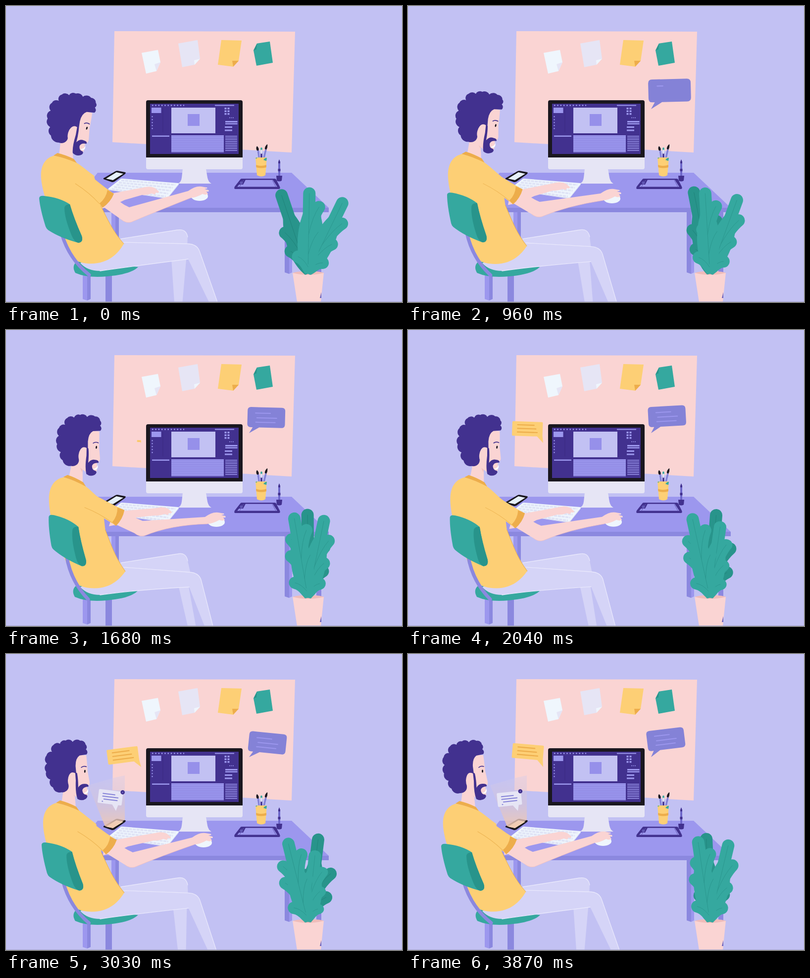
An HTML page that plays this animation: 800x600 px, repeating every 3900 ms.

```html
<!DOCTYPE html>
<html lang="en">
<head>
<meta charset="utf-8">
<title>Designer at a desk</title>
<style>
html, body { margin: 0; width: 100%; height: 100%; overflow: hidden; background: #c2c1f3; }
svg { display: block; width: 100vw; height: 100vh; }
.skin { fill: #fad4d3; } .dark { fill: #42318f; } .lilac { fill: #9c97ee; } .edge { fill: #8b88df; }
.pale { fill: #e6e5f5; } .ice { fill: #eff6fd; } .sun { fill: #fdcf75; } .amber { fill: #edad4b; }
.teal { fill: #35a89f; } .deep { fill: #28948b; } .ink { fill: #1a171f; } .cloth { fill: #d5d4f7; }
.line { fill: none; stroke-linecap: round; stroke-linejoin: round; }
</style>
</head>
<body>
<svg viewBox="0 0 800 600" preserveAspectRatio="none">
<defs>
  <linearGradient id="glow" x1="0" y1="1" x2="0" y2="0">
    <stop offset="0" stop-color="#f3c9ad" stop-opacity=".9"/>
    <stop offset=".45" stop-color="#d9c4d2" stop-opacity=".6"/>
    <stop offset="1" stop-color="#cfcbee" stop-opacity=".35"/>
  </linearGradient>
</defs>
<rect width="800" height="600" fill="#c2c1f3"/>
<path d="M219 51L584 52 577 297 215 276Z" class="skin"/>
<g id="notes">
  <path class="ice" d="M274 95L307 89 312 114 304 132 283 137Z"/>
  <path class="pale" d="M300 118L312 114 304 132Z"/>
  <path class="pale" d="M348 76L387 69 392 107 381 119 356 124Z"/>
  <path class="ice" d="M380 110L392 107 381 119Z"/>
  <path class="sun" d="M435 69L476 70 470 111 459 123 428 119Z"/>
  <path class="amber" d="M457 111L470 111 459 123Z"/>
  <path class="teal" d="M507 76L533 72 539 115 506 121 500 90Z"/>
  <path class="deep" d="M507 76L506 88 500 90Z"/>
</g>
<g id="desk">
  <path class="lilac" d="M213 418h8v90h-8zM572 418h6v122l-6 3z"/>
  <path class="edge" d="M221 418h7v90h-7zM563 418h9v125l-9-3zM627 418h10v172l-10 4z"/>
  <path class="lilac" d="M185 338H577L652 409H130Z"/>
  <path class="edge" d="M130 409H652V418H130Z"/>
</g>
<g id="monitor">
  <path class="pale" d="M357 330H404L407 348Q409 357 415 360H347Q354 357 355 348Z"/>
  <path class="pale" d="M283 306H478V327Q478 331 474 331H287Q283 331 283 327Z"/>
  <path class="ink" d="M287 191H474Q478 191 478 195V307H283V195Q283 191 287 191Z"/>
  <path class="dark" d="M291 198H470V300H291Z"/>
  <path class="lilac" d="M294 206h19.500v11h-19.500zM422 200.500h39v2h-39zM295 262.500h35v2.500h-35zM443 233h24.500v3h-24.500zM443 237.500h24.500v2.500h-24.500zM442 244h15v3h-15zM442 250.500h15v3h-15zM334 262h106v34.500h-106z"/>
  <path d="M334 206H423V258H334Z" fill="#c2c1f3"/>
  <rect x="367" y="219" width="24" height="24" fill="#9690ea"/>
  <path d="M317 206V256" stroke="#382881"/>
  <g class="line" style="stroke-linecap:butt" stroke="#9c97ee">
    <path d="M295 201.500H360" stroke-width="2.600" stroke-dasharray="2.500 3.800"/>
    <path d="M295.500 223V252" stroke-width="2" stroke-dasharray="2.500 3.500"/>
    <path d="M443.500 206V221M449.500 206V221" stroke-width="4" stroke-dasharray="3.500 2"/>
    <path d="M451 226.500H460" stroke-width="1.500" stroke-dasharray="2 1.500"/>
  </g>
  <g id="stripes"></g>
</g>
<g id="keyboard">
  <path d="M236 350L348 359Q350 360 348 363L328 388Q326 391 322 390L208 373Q205 371 208 369L231 351Q233 349 236 350Z" class="ice"/>
  <path d="M347 363L328 387Q326 390 322 389L208 372" class="line" stroke="#d5daf0"/>
  <g id="keys" class="line" style="stroke-linecap:butt" stroke="#dfe3f5" stroke-width="3.600" stroke-dasharray="6.200 1.500"></g>
</g>
<g id="tablet">
  <path class="dark" d="M476 350H543Q545 350 546 352L553 366Q555 371 551 371H463Q460 371 462 366L473 352Q474 350 476 350Z"/>
  <path class="lilac" d="M484 352.500H539L548 366.500H467L471 362H479Z"/>
  <path d="M480 353L472 366M538 353L545 366" stroke="#6258b5"/>
  <circle cx="475.500" cy="358.500" r="3" fill="#6258b5"/>
</g>
<g id="pens">
  <path d="M550 345V317L552 311 554 317V345Z" fill="#6d66c9"/>
  <path class="dark" d="M550 319h4v-3l-2-5-2 5zM549.500 330h5v5h-5zM546 344H558L557 354Q552 357 547 354Z"/>
  <g class="line" stroke-width="3.500">
    <path d="M509 291L512 312M525 291L520 312" stroke="#8482d7"/>
    <path d="M516 297V312" stroke="#42318f"/><path d="M516 288.500V292" stroke="#35a89f"/>
    <path d="M516 293V298" stroke="#e6e5f5"/>
  </g>
  <path class="ink" d="M507 284Q512 288 510 293H507Q504 288 507 284ZM528 280Q529 287 526 291L523 290Q522 285 528 280Z"/>
  <path class="sun" d="M504 307H527L524 343Q516 348 507 343Z"/>
  <path class="amber" d="M505 322Q515 326 526 322V327Q515 330 505.500 327Z"/>
  <path d="M504 308Q506 311 508 307M520 312Q524 307 527 308L526 314Z" fill="#35a89f"/>
</g>
<g id="phone">
  <path class="ink" d="M197 351Q196 349 199 348L221 335Q223 334 225 334L241 337Q243 338 240 341L219 356Q217 357 214 357Z"/>
  <path id="screen" d="M202 350L223 337 237 340 216 353Z"/>
  <path id="beam" d="M200 349L166 266 218 251 240 246V336L216 353Z" fill="url(#glow)"/>
</g>
<g id="say1">
  <path fill="#8482d7" d="M494 156H556Q563 156 563 163V190Q563 197 556 197H511L491 209 498 197H494Q487 197 487 190V163Q487 156 494 156Z"/>
  <g class="line" stroke="#9c97ee" stroke-width="2"></g>
</g>
<g id="say2">
  <path class="sun" d="M210 186H269Q271 186 271 188V214L273 229 260 216H210Q208 216 208 214V188Q208 186 210 186Z"/>
  <path class="line" stroke="#edad4b" stroke-width="2.200" d="M219 193H253M219 200.500H257M219 208H260"/>
</g>
<g id="say3">
  <path class="pale" d="M185 278H230Q232 278 232 280V304Q232 306 230 306H225L222 318 213 306H185Q183 306 183 304V280Q183 278 185 278Z"/>
  <path class="line" stroke="#8482d7" stroke-width="2" d="M192 286H216M192 291.500H223M195 297H222M192 302H193"/>
  <circle class="dark" cx="231" cy="279" r="4.300"/><path d="M230 280L232 278" stroke="#9c97ee"/>
</g>
<path id="armFar" class="skin"/>
<g id="chair">
  <path class="lilac" d="M155 543H164V597L155 594Z"/><path class="edge" d="M164 543H171V594L164 597ZM201 545H214V600H201Z"/>
  <path id="seat" class="teal" d="M143 518Q132 527 140 541Q165 552 205 548Q252 544 267 529Z"/>
</g>
<path id="legFar" class="cloth"/><path id="legNear" class="cloth"/>
<path id="legLine" class="line" stroke="#e9e8fc" stroke-width="1.300"/>
<g id="torso">
  <path class="skin" d="M111 270L107 303 122 318 136 312 133 280Z"/>
  <path d="M124 274L133 281 133 290Z" fill="#eebfbd"/>
  <path class="sun" d="M98 303C78 308 69 325 71 350C75 392 98 435 121 482C130 510 143 521 165 522C198 524 222 510 238 482C215 456 204 430 190 402L178 344C160 331 146 318 134 313Z"/>
  <path class="amber" d="M96 303L104 298Q121 302 137 310L143 318Q120 308 96 303Z"/>
  <path class="line" stroke="#e8b052" d="M238 482C215 456 204 430 190 402"/>
</g>
<g id="armNear"><ellipse id="mouse" class="ice" rx="17" ry="9.500"/><path id="fore" class="skin"/><path id="nails" class="line" stroke="#fff" stroke-width="1.200"/><path id="skinLine" class="line" stroke="#f1bfbd" stroke-width=".8"/></g>
<g id="sleeve">
  <path class="sun" d="M128 314C152 325 172 348 217 380L195 408C176 391 156 372 136 359Z"/>
  <path class="amber" d="M205 373L218 380.500Q211 398 195 409L189 400Q202 390 205 373Z"/>
  <path class="line" stroke="#edb553" d="M140 360Q168 378 189 401"/>
</g>
<g id="head">
  <path class="skin" d="M122 225L134 205H152Q154 218 156 237L161 259Q162 266 156 267L158 283Q157 294 145 295L124 283 112 277Z"/>
  <path id="hair" class="dark"/>
  <ellipse class="skin" cx="125" cy="257" rx="8" ry="15"/>
  <path class="dark" d="M131 240L135 242Q138 255 138.500 271Q143 262 152 263Q160 263 159 268Q148 269 147 276Q148 285 156 285Q160 288 155 293Q147 299 138 294Q133 282 133 257Z"/>
  <path fill="#fff" d="M158 270Q159 279 150 282Q158 285 159 277Z"/>
  <ellipse class="ink" cx="150.500" cy="237.500" rx="1.500" ry="3"/>
  <path class="line" stroke="#42318f" stroke-width="1.700" d="M143 230Q147 226 153 228"/>
</g>
<g id="back">
  <path class="line" stroke="#8b88df" stroke-width="7" d="M113 463Q128 513 168 545"/>
  <path class="teal" d="M67 390Q67 384 77 385Q108 388 129 402Q137 430 153 466Q157 479 146 480Q109 470 85 454Q82 452 80 447Q69 412 67 390Z"/>
  <path class="deep" d="M118 409Q119 402 129 402Q137 430 153 466Q157 479 146 480Q138 478 133 466Q118 430 118 409Z"/>
</g>
<g id="plant">
  <ellipse cx="611" cy="542" rx="31.500" ry="4.500" fill="#efbcba"/>
  <g id="leafDark"></g><g id="leafSide"></g><g id="leafRight"></g><g id="leafFront"></g>
  <path class="skin" d="M579 541Q610 549 642 541L636 600H588Z"/>
  <path d="M634 592L637 580V592Z" fill="#6a62bd"/>
</g>
<path d="M0 599.500H800" stroke="#a9a8cf"/>
</svg>
<script>
const LOOP = 3900;
const $ = id => document.getElementById(id);
const set = (id, name, value) => $(id).setAttribute(name, value);
const move = (id, value) => set(id, 'transform', value);
const clamp = v => Math.max(0, Math.min(1, v));
const swing = u => (1 - Math.cos(Math.PI * u)) / 2;

// Repeated screen and keyboard details
let bars = '';
for (let y = 265; y < 296; y += 4.2) bars += `<path d="M334 ${y}H440" stroke="#837dd8"/>`;
for (let y = 264; y < 295; y += 3.6) bars += `<path d="M443 ${y}H467" stroke="#9c97ee" stroke-width="1.6"/>`;
$('stripes').innerHTML = bars;
for (let i = 0; i < 5; i++) {
  const x = 233 - i * 4.8, y = 353.5 + i * 4.4;
  $('keys').innerHTML += `<path d="M${x} ${y}L${x + 109} ${y + 9 + i * 1.5}"/>`;
}

function scallops(points) {
  return points.map(([x, y], i) => {
    if (!i) return `M${x} ${y}`;
    const r = 0.68 * Math.hypot(x - points[i - 1][0], y - points[i - 1][1]);
    return `A${r} ${r} 0 0 1 ${x} ${y}`;
  }).join('');
}
set('hair', 'd', scallops([[119, 270], [105, 282], [88, 273], [82, 257], [73, 242], [74, 225], [72, 209], [83, 201],
  [85, 187], [98, 184], [109, 177], [123, 179], [138, 176], [149, 183], [150, 193], [152, 203]]) +
  'L138 206Q130 212 131 228L133 243Q121 236 118 250Z');

// Each lobe: tip x, tip y, height on the midrib where it begins
function leaf(id, color, vein, lobes, body) {
  const strokes = lobes.map(([x, y, root]) => {
    const len = Math.hypot(x, y + root), k = 1 - 12 / len;
    return `M0 ${-root}Q${x * 0.3} ${y * 0.55 - root * 0.45} ${x * k} ${-root + (y + root) * k}`;
  }).join('');
  $(id).innerHTML = `<path class="line" d="${strokes}" stroke="${color}" stroke-width="25"/>` +
    (body ? `<path fill="${color}" d="M-6 0C-32 -40 -24 -110 0 -148C24 -110 32 -40 6 0Z"/>` : '') +
    `<path class="line" d="${strokes}" stroke="${vein}" stroke-width=".8"/>`;
}
leaf('leafDark', '#28948b', '#1f8279', [[0, -180, 30], [39, -113, 40], [38, -63, 18], [-21, -105, 40], [-24, -65, 18]], true);
leaf('leafSide', '#35a89f', '#2a958d', [[-26, -132, 70], [-31, -98, 40]]);
leaf('leafRight', '#35a89f', '#2a958d', [[0, -171, 20], [21, -133, 65], [22, -86, 35], [25, -42, 14]], true);
leaf('leafFront', '#35a89f', '#2a958d', [[0, -175, 20], [24, -147, 80], [24, -96, 40], [-29, -43, 14]], true);

// Smooth curve through the pose values
const times = [0, 480, 960, 1680, 2370, 3030, 3870];
function track(v, t) {
  const last = times.length - 1;
  if (t >= times[last]) return v[last];
  let i = 0;
  while (times[i + 1] <= t) i++;
  const h = times[i + 1] - times[i], u = (t - times[i]) / h;
  const slope = j => {
    const a = Math.max(0, j - 1), b = Math.min(last, j + 1);
    return (v[b] - v[a]) / (times[b] - times[a]) * h;
  };
  const a = v[i], b = v[i + 1], u2 = u * u, u3 = u2 * u;
  return a * (2 * u3 - 3 * u2 + 1) + slope(i) * (u3 - 2 * u2 + u) + b * (3 * u2 - 2 * u3) + slope(i + 1) * (u3 - u2);
}
function steps(t, list) {
  if (t <= list[0][0]) return list[0][1];
  for (let i = 1; i < list.length; i++) {
    const [a, x] = list[i - 1], [b, y] = list[i];
    if (t < b) return x + (y - x) * swing((t - a) / (b - a));
  }
  return list[list.length - 1][1];
}

const pose = {
  headTurn: [17, 15.5, 13, 8, 6.5, 2.5, 0],
  headY: [302, 300, 298, 295, 295, 296, 296],
  sleeve: [0, -3, -6.5, -11, -2, -2.5, -3],
  elbowX: [245, 252, 262, 272, 257, 252, 248],
  elbowY: [438, 432, 427, 417, 436, 432, 431],
  mouseX: [391, 399, 412, 425, 404, 399, 394],
  mouseY: [384, 387, 389, 388, 387, 381, 378],
  farX: [309, 311, 327, 335, 335, 333, 330],
  farY: [377, 371, 368, 370, 367, 372, 371]
};

function drawBody(t) {
  const at = name => track(pose[name], t);
  const p = t < 1650 ? swing(t / 1650) : 1 - swing(clamp((t - 1650) / 2100));

  move('torso', `rotate(${5.2 * p} 160 520)`);
  move('back', `rotate(${7.6 * p} 160 530)`);
  move('seat', `translate(${-p} 0)`);

  const turn = at('headTurn');
  const headX = t < 1650 ? 141 + 28 * p : 145 + 24 * p;
  move('head', `translate(${headX} ${at('headY')}) rotate(${turn}) translate(-145 -296)`);
  const wide = 1 + 0.1 * turn / 17;
  move('hair', `translate(${112 * (1 - wide)} 0) scale(${wide} 1)`);

  const sleeve = at('sleeve'), r = sleeve * Math.PI / 180, shift = 16 * p;
  move('sleeve', `translate(${shift} 0) rotate(${sleeve} 140 345)`);
  const ex = 140 + shift + 65 * Math.cos(r) - 48 * Math.sin(r);
  const ey = 345 + 65 * Math.sin(r) + 48 * Math.cos(r);

  const kx = at('farX'), ky = at('farY');
  set('armFar', 'd', `M${ex - 13 - 8 * p} ${ey + 18}L${ex - 14} ${ey - 4}L${ex + 8} ${ey - 13}` +
    `L${kx - 32} ${ky - 9}Q${kx - 18} ${ky - 13} ${kx - 8} ${ky - 8}L${kx} ${ky - 1}Q${kx} ${ky + 3} ${kx - 6} ${ky + 1}` +
    `L${kx - 8} ${ky + 5}L${kx - 15} ${ky + 3}Q${kx - 24} ${ky + 7} ${kx - 34} ${ky + 6}` +
    `L${ex + 35} ${ey}Q${ex + 8} ${ey + 14} ${ex - 13 - 8 * p} ${ey + 18}Z`);

  const bx = at('elbowX'), by = at('elbowY'), mx = at('mouseX'), my = at('mouseY');
  set('mouse', 'cx', mx); set('mouse', 'cy', my + 1.5);
  const under = `M${mx - 18} ${my + 5}Q${bx + 60} ${by - 22} ${bx + 8} ${by}Q${bx - 2} ${by + 3} ${bx - 12} ${by - 5}`;
  set('fore', 'd', `${under}L${ex - 10} ${ey + 13}L${ex + 10} ${ey - 12}Q${bx - 16} ${by - 38} ${bx + 4} ${by - 30}` +
    `L${mx - 23} ${my - 9}Q${mx - 8} ${my - 20} ${mx + 4} ${my - 18}L${mx + 15} ${my - 16}` +
    `Q${mx + 16} ${my - 14} ${mx + 10} ${my - 13}L${mx + 18} ${my - 11}Q${mx + 20} ${my - 7} ${mx + 14} ${my - 8}` +
    `L${mx + 17} ${my - 3}Q${mx + 15} ${my} ${mx + 6} ${my - 3}Q${mx - 6} ${my + 4} ${mx - 18} ${my + 5}Z`);
  set('nails', 'd', `M${mx + 14} ${my - 15}h1M${mx + 17} ${my - 9}h1M${mx + 14} ${my - 2}h1`);
  set('skinLine', 'd', under);

  const kneeY = 484 + 9 * p, foot = 427 - 9 * p, farFoot = 340 + 27 * p, kneeX = 383 + 3 * p;
  const inner = `L${foot - 17} 600L${368 + 2 * p} ${513 + 8 * p}`;
  const top = `M238 ${479 + 2 * p}L${kneeX - 15} ${kneeY - 2}Q${kneeX + 3} ${kneeY - 1} ${kneeX + 8} ${kneeY + 13}`;
  set('legNear', 'd', `${top}L${foot} 600${inner}Q260 527 190 537Q164 537 150 521L226 490Z`);
  set('legFar', 'd', `M220 475L232 472L346 454Q364 ${451 - p} 367 468L${366 + 6 * p} 490` +
    `L${364 + 5 * p} ${515 + 5 * p}L${farFoot + 16.5} 600H${farFoot}L${334 + 13 * p} 512L230 510Z`);
  set('legLine', 'd', `${top}L${foot} 600M${368 + 2 * p} ${513 + 8 * p}Q260 527 190 537M232 472L346 454Q364 ${451 - p} 367 468`);
}

function drawPlant(t) {
  const q = swing(t / 2700) / 0.963;
  const at = 'translate(610 543) ';
  const front = 1 - 15 * q;
  move('leafDark', `${at}rotate(${-18.5 + 25.5 * q})`);
  move('leafRight', `${at}rotate(${25.8 - 19.8 * q}) scale(1 ${1 - 0.15 * clamp((q - 0.75) / 0.25)})`);
  move('leafFront', `${at}rotate(${front})`);
  move('leafSide', `${at}rotate(${front + 14 * (1 - q)})`);
}

function bubble(id, x, y, turn, size) {
  move(id, `translate(${x} ${y}) rotate(${turn}) scale(${size}) translate(${-x} ${-y})`);
  set(id, 'visibility', size > 0 ? 'visible' : 'hidden');
}
const words = [[503, 168, 30], [506, 177.5, 40], [504, 186.5, 39]];
function drawTalk(t) {
  bubble('say1', 491, 209, steps(t, [[960, -1.5], [1500, 1.5], [1680, 1.5], [2370, -7], [3090, 6], [3870, -7]]),
    steps(t, [[810, 0], [960, 1.13], [1110, 0.97], [1230, 1]]));
  $('say1').lastElementChild.innerHTML = words.map(([x, y, w], i) => {
    const grown = clamp((t - 880 - 180 * i) / 240);
    return grown ? `<path d="M${x} ${y}h${w * grown}"/>` : '';
  }).join('');
  bubble('say2', 273, 229, steps(t, [[2100, 2], [2370, 3], [3060, -7.5], [3870, 5]]),
    steps(t, [[1640, 0], [1680, 0.13], [1860, 1.12], [2010, 0.97], [2100, 1]]));
  bubble('say3', 222, 318, steps(t, [[2520, -5], [3000, 7], [3870, -6]]),
    steps(t, [[2520, 0], [2700, 1.12], [2820, 0.98], [2900, 1]]));
  const lit = steps(t, [[2100, 0], [2250, 1]]);
  set('beam', 'opacity', lit);
  const mix = (a, b) => Math.round(a + (b - a) * lit);
  set('screen', 'fill', `rgb(${mix(230, 253)},${mix(240, 229)},${mix(250, 184)})`);
}

function frame() {
  const t = performance.now() % LOOP;
  drawBody(t);
  drawPlant(t);
  drawTalk(t);
  requestAnimationFrame(frame);
}
frame();
</script>
</body>
</html>
```
